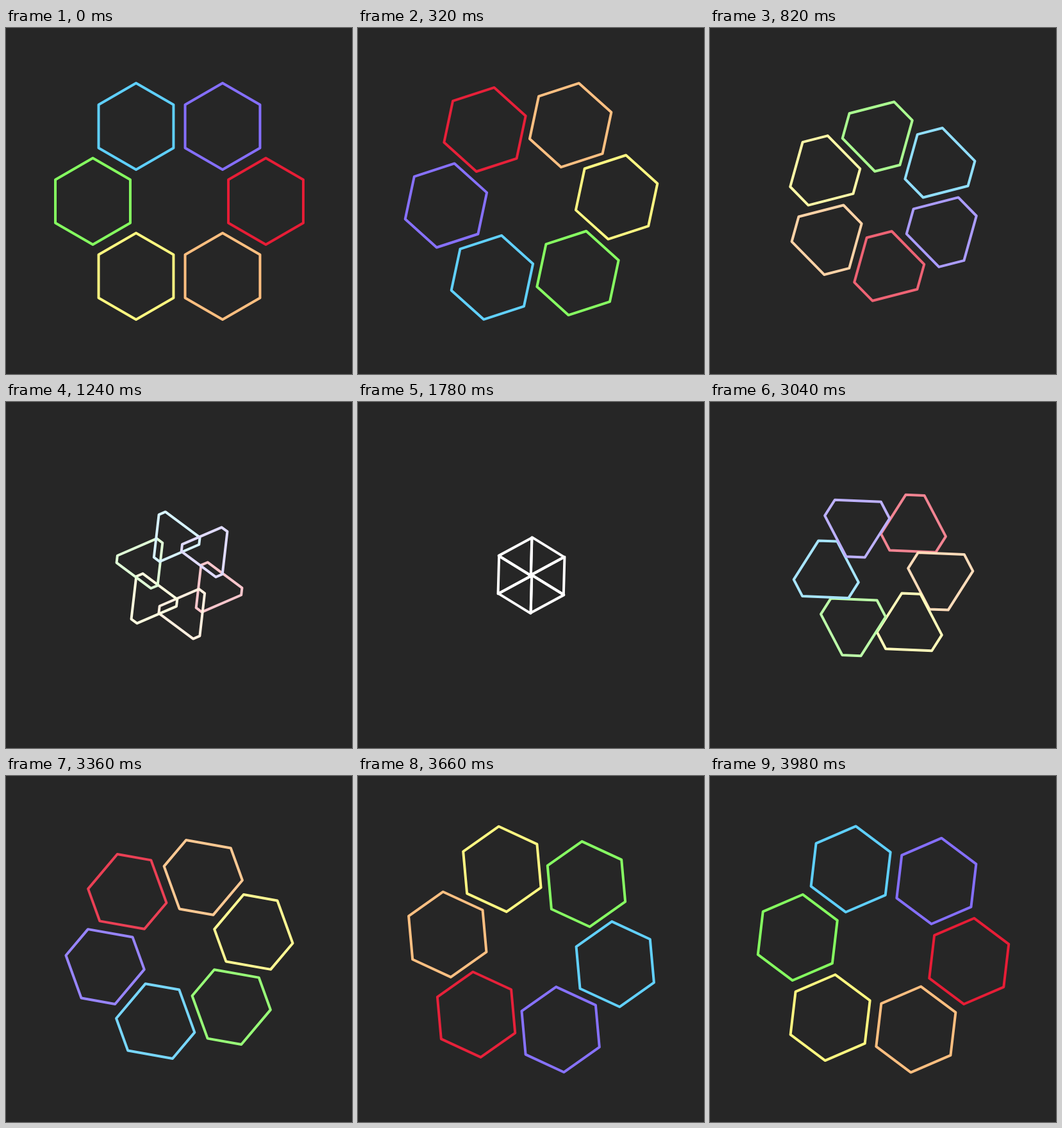
Animation of 540x540 px, one loop 4000 ms. Source, as an HTML page with a canvas:

```html
<!DOCTYPE html>
<html lang="en">
<head>
<meta charset="utf-8">
<title>Six hexagons</title>
<style>
  html, body { margin: 0; width: 100%; height: 100%; overflow: hidden; background: #262626; }
  canvas { display: block; width: 540px; height: 540px; }
</style>
</head>
<body>
<canvas id="stage" width="540" height="540"></canvas>
<script>
const ctx = document.getElementById('stage').getContext('2d');
const LOOP = 4000, STEP = 20, CENTER = 270.5;
const RING = 135, SIZE = 67.5;
const COLORS = [
  [231, 29, 54],    // red
  [255, 191, 128],  // orange
  [255, 247, 128],  // yellow
  [133, 255, 96],   // green
  [95, 208, 255],   // blue
  [133, 111, 255],  // purple
];

const rad = deg => deg * Math.PI / 180;
const mix = (a, b, k) => a + (b - a) * k;

// Smooth steps of fifth and seventh degree
const smooth5 = x => x ** 3 * (10 - 15 * x + 6 * x * x);
const smooth7 = x => x ** 4 * (35 - 84 * x + 70 * x * x - 20 * x ** 3);

function drawCell(x, y, size, turn, merge, color) {
  const spread = 30 * (1 - merge);
  ctx.beginPath();
  for (let corner = 60; corner < 420; corner += 120) {
    for (const side of [-1, 1]) {
      const a = rad(turn + corner + side * spread);
      ctx.lineTo(x + size * Math.cos(a), y + size * Math.sin(a));
    }
  }
  ctx.closePath();
  ctx.strokeStyle = `rgb(${color.map(c => Math.round(mix(c, 255, merge)))})`;
  ctx.stroke();
}

function draw(time) {
  const t = time % LOOP / LOOP;
  const merge = smooth7(1 - Math.abs(1 - 2 * t));  // 0: hexagons, 1: triangles
  const u = (t + 0.5) % 1;                         // fastest as the loop restarts
  const orbit = -720 * (smooth7(u) - 0.5);
  const twist = -720 * (smooth5(u) - 0.5) - (t < 0.5 ? 120 : -120) * merge;
  const ring = mix(RING, RING / 4, merge);
  const size = mix(SIZE, SIZE / 2, merge);

  ctx.fillStyle = '#262626';
  ctx.fillRect(0, 0, 540, 540);
  ctx.lineWidth = 4;
  ctx.lineJoin = 'round';
  COLORS.forEach((color, i) => {
    const a = rad(orbit + 60 * i);
    drawCell(CENTER + ring * Math.cos(a), CENTER + ring * Math.sin(a),
      size, twist + 60 * i, merge, color);
  });
}

let start;
function frame(now) {
  start ??= now;
  draw(Math.floor((now - start) / STEP + 0.01) * STEP);
  requestAnimationFrame(frame);
}
draw(0);
requestAnimationFrame(frame);
</script>
</body>
</html>
```
